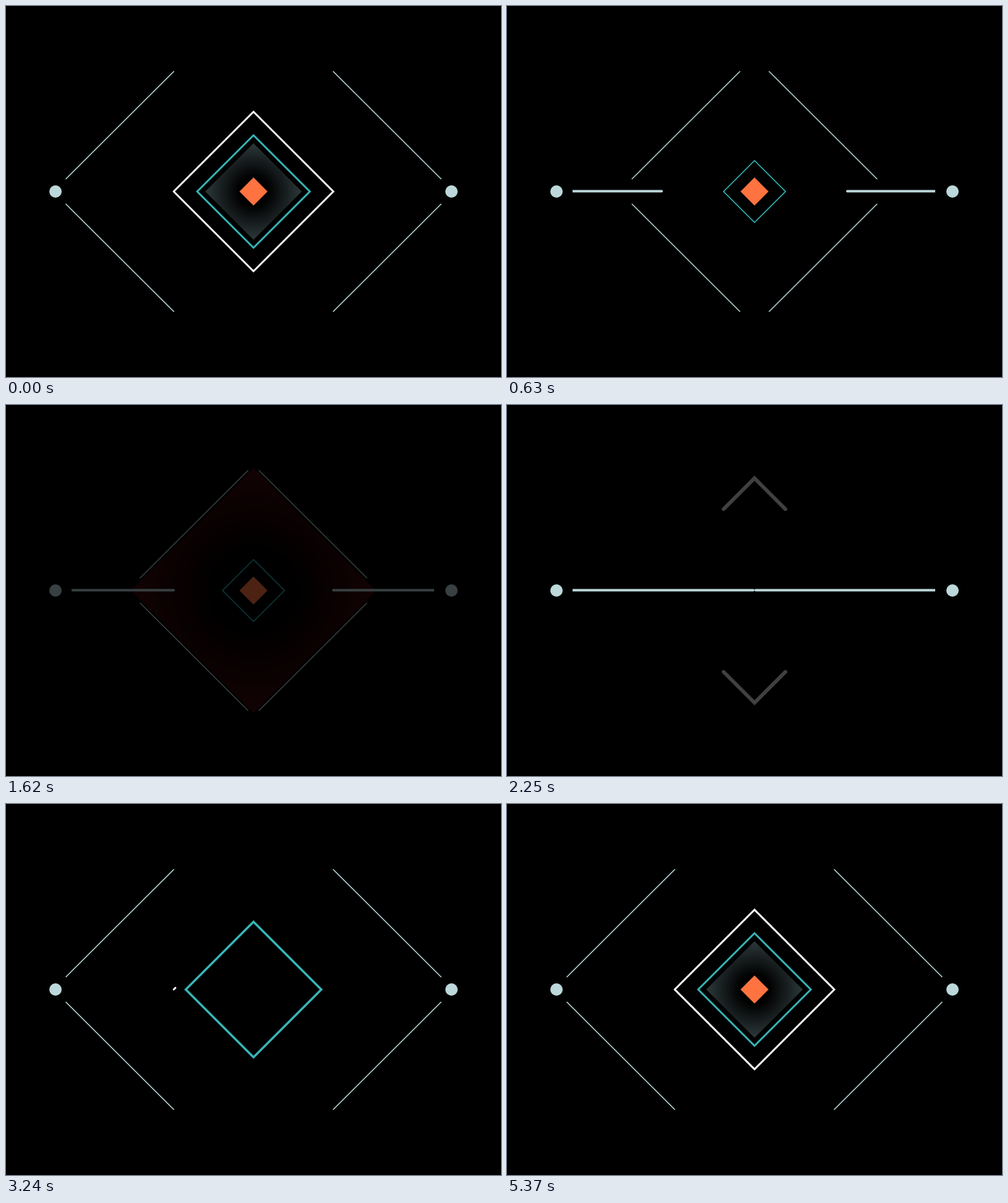
Recreate the animation shown at these times as an HTML page. Size 800 by 600 pixels, loop 5400 ms.

```html
<!DOCTYPE html>
<html lang="en">
<head>
<meta charset="utf-8">
<title>Diamond loop</title>
<style>
  html, body { margin: 0; width: 100%; height: 100%; overflow: hidden; background: #000; }
  svg { display: block; width: 100vw; height: 100vh; }
  path, line { fill: none; }
  .mist { stroke: #bcd8da; stroke-linecap: round; }
  .corner { stroke-width: 1.7; stroke-dasharray: 1 2; }
  .beam { stroke-width: 4; }
  .chevron { stroke-width: 6; stroke-linecap: round; }
</style>
</head>
<body>
<svg viewBox="0 0 800 600">
  <defs>
    <radialGradient id="ember" gradientUnits="userSpaceOnUse" cx="0" cy="0" r="198">
      <stop offset=".3" stop-color="#000"/>
      <stop offset="1" stop-color="#420a0c"/>
    </radialGradient>
    <radialGradient id="smoke" gradientUnits="userSpaceOnUse" cx="0" cy="0" r="78">
      <stop offset=".3" stop-color="#000"/>
      <stop offset="1" stop-color="#2d393b"/>
    </radialGradient>
    <clipPath id="gap"><rect x="-294" y="-10" width="294" height="20"/></clipPath>
    <clipPath id="gapRight"><rect x="-292" y="-10" width="292" height="20"/></clipPath>
    <path id="unit" d="M-1 0L0-1 1 0 0 1Z"/>
  </defs>
  <g transform="translate(400 300)">
    <g id="stage">
      <path id="red" d="M-198 0L0-198 198 0 0 198Z" style="fill:url(#ember)"/>
      <g class="side">
        <line class="mist corner" pathLength="1" x1="-303" y1="-20.5" x2="-129" y2="-194"/>
        <line class="mist corner" pathLength="1" x1="-303" y1="20.5" x2="-129" y2="194"/>
        <g clip-path="url(#gap)"><line class="mist beam" x1="-500" x2="0" y1="-.5" y2="-.5"/></g>
        <circle cx="-320" r="10" fill="#bcd8da"/>
      </g>
      <g class="side" transform="scale(-1 1)">
        <line class="mist corner" pathLength="1" x1="-303" y1="-20.5" x2="-129" y2="-194"/>
        <line class="mist corner" pathLength="1" x1="-303" y1="20.5" x2="-129" y2="194"/>
        <g clip-path="url(#gapRight)"><line class="mist beam" x1="-500" x2="0" y1="-.5" y2="-.5"/></g>
        <circle cx="-320" r="10" fill="#bcd8da"/>
      </g>
      <path class="chevron" pathLength="2" d="M-181.5 0L0-181.5 181.5 0"/>
      <path class="chevron" pathLength="2" d="M-181.5 0L0 181.5 181.5 0"/>
      <path id="grey" d="M-78 0L0-78 78 0 0 78Z" style="fill:url(#smoke)"/>
      <path id="teal" d="M-91 0L0-91 91 0 0 91Z" stroke="#38b6b8" stroke-width="3"/>
      <path id="white" pathLength="516" d="M-129 0L0-129 129 0 0 129Z" stroke="#fff"
            stroke-width="3" stroke-linecap="round" stroke-dasharray="517 1000"/>
      <path id="core" d="M-22.7 0L0-22.7 22.7 0 0 22.7Z" style="fill:#ff7340"/>
    </g>
  </g>
</svg>
<script>
const LOOP = 5400;
const HOLD = 'step-end';
const QUART = 'cubic-bezier(.76,0,.24,1)';
const SMOOTH = 'ease-in-out';

// Each step: [time in ms, value, easing towards the next step]
function track(selector, prop, steps, format = v => v) {
  const last = steps[steps.length - 1];
  const frames = [...steps, [LOOP, last[1]]].map(([time, value, easing = HOLD]) =>
    ({ offset: time / LOOP, [prop]: format(value), easing }));
  document.querySelectorAll(selector).forEach(el =>
    el.animate(frames, { duration: LOOP, iterations: Infinity }));
}
const fade = (selector, steps) => track(selector, 'opacity', steps);
const scale = (selector, steps) => track(selector, 'transform', steps, v => `scale(${v})`);
const slide = (selector, steps) => track(selector, 'transform', steps, v => `translateX(${v}px)`);

// Blink between the two scenes
fade('#stage', [[0, 1], [1620, .3], [1650, 1], [1710, .3], [1740, 1], [1800, .3], [1830, 1]]);

fade('#red', [[0, 0], [630, 0, SMOOTH], [840, 1], [1890, 0]]);
scale('#red', [[0, 1.05], [630, 1.05, 'ease-out'], [840, 1]]);

slide('.corner', [[0, 0], [160, 0, QUART], [876, 120], [1890, 0]]);
fade('.corner', [[0, 1], [1890, 0], [2265, 1]]);
track('.corner', 'strokeDashoffset', [[0, 0], [1890, 1], [2250, 1, SMOOTH], [2800, 0]]);
slide('.beam', [[0, -300], [160, -300, QUART], [876, -129], [1890, -2],
  [2250, -2, SMOOTH], [2800, -300]]);

fade('.chevron', [[0, 0], [2250, 1], [2813, 0]]);
track('.chevron', 'stroke', [[0, '#404040'], [2250, '#404040', 'linear'], [2700, '#38b6b8']]);
track('.chevron', 'strokeDasharray', [[0, .275], [2250, .275, SMOOTH], [2800, 1]], a => `${2 * a} 4`);
track('.chevron', 'strokeDashoffset', [[0, .275], [2250, .275, SMOOTH], [2800, 1]], a => a - 1);

fade('#teal', [[0, 1], [1890, 0], [2813, 1]]);
scale('#teal', [[0, 1, QUART], [640, .55], [1890, 2], [2813, 2, QUART], [3527, 1]]);

fade('#grey', [[0, 1, SMOOTH], [450, 0], [3390, 0, SMOOTH], [3900, 1]]);
scale('#core', [[0, 1], [1890, 0], [3390, 0, QUART], [3900, 1]]);

// The outline bursts outward, then is traced again in three strokes
fade('#white', [[0, 1], [150, 1, 'linear'], [590, 0], [3235, 1]]);
scale('#white', [[0, 1, QUART], [600, 1.88], [1890, 1]]);
track('#white', 'strokeDashoffset', [
  [0, 0], [1890, 516], [3230, 516, 'cubic-bezier(.3,.27,.6,1)'],
  [4050, 371.2], [4080, 371.2, SMOOTH],
  [4460, 159.5], [4530, 159.5, 'cubic-bezier(.5,0,1,1)'], [5370, 0]
]);
</script>
</body>
</html>
```
